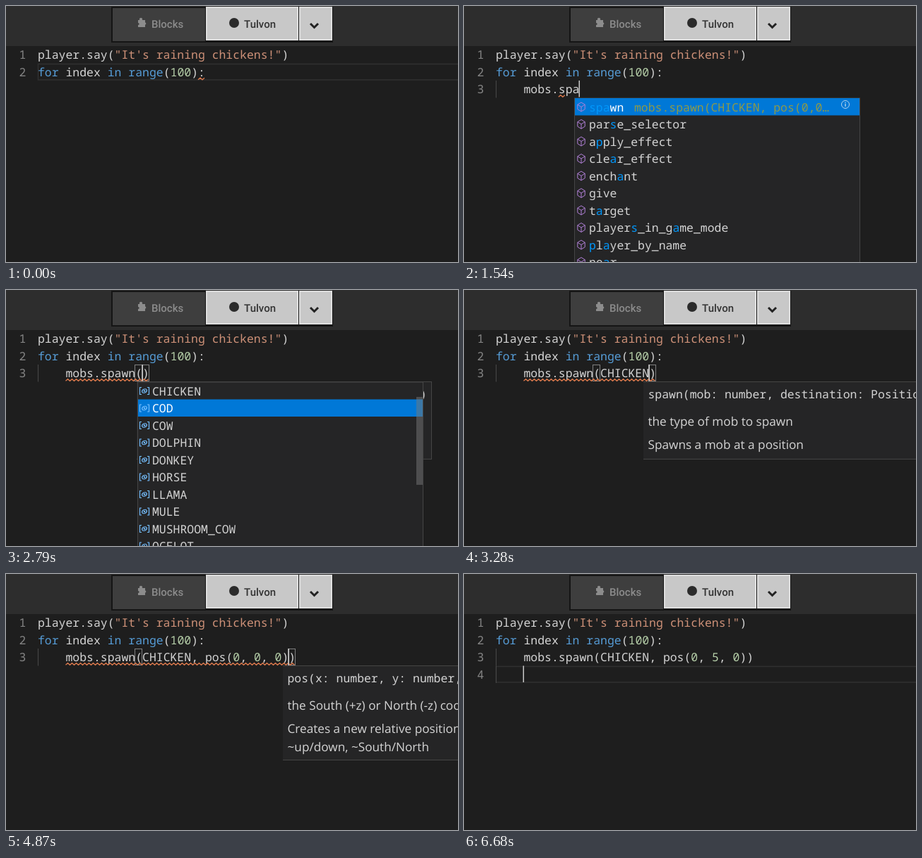
An HTML page with a canvas for the animation above (6750 ms loop, 640 by 364 pixels).

```html
<!DOCTYPE html>
<html lang="en">
<head>
<meta charset="utf-8">
<title>Code editor</title>
<style>
html, body { margin: 0; width: 100%; height: 100%; overflow: hidden; background: #1e1e1e; }
canvas { display: block; }
</style>
</head>
<body>
<canvas id="stage" width="640" height="364"></canvas>
<script>
const ctx = document.getElementById('stage').getContext('2d');
const LOOP = 6750, CHAR = 9.87, ROW = 24.5, LEFT = 45, TOP = 57, POP_Y = 130.5;
const MONO = '500 16.45px "Noto Sans Mono", monospace';
const UI = '500 15px Roboto, sans-serif';
const DOC = '17.2px "Open Sans", sans-serif';
const FG = '#d4d4d4', INDENT = LEFT + 4 * CHAR;

const LISTS = {
  mobs: 'spawn on_mob_killed kill monster apply_effect clear_effect give teleport_to_position teleport_to_player enchant'
    .split(' ').map(s => 'mobs.' + s),
  members: 'spawn parse_selector apply_effect clear_effect enchant give target players_in_game_mode player_by_name near'.split(' '),
  animals: 'CHICKEN COD COW DOLPHIN DONKEY HORSE LLAMA MULE MUSHROOM_COW OCELOT'.split(' '),
  places: 'pos world randpos agent.get_position player.position positions.add builder.position positions.ground_position Position.to_world Position'.split(' ')
};
const DETAIL = {
  mobs: ['mobs.spawn(CHICKEN, po…', 136],
  members: ['mobs.spawn(CHICKEN, pos(0,0…', 85],
  places: ['pos(0, 0, 0)', 252]
};
const SLIDER = { mobs: [131, 48], animals: [152, 125] };
const HINTS = {
  spawn: { h: 111, lines: ['spawn(mob: number, destination: Position)', 'the type of mob to spawn', 'Spawns a mob at a position'] },
  pos: { h: 135, lines: ['pos(x: number, y: number, z: number)', 'the South (+z) or North (-z) coordinate',
    'Creates a new relative position: ~East/West,', '~up/down, ~South/North'] }
};

// [start, third line, caret, list, selected row, hint]
const CALL = 'mobs.spawn(', FULL = CALL + 'CHICKEN, pos(0, 0, 0))', DONE = FULL.replace(', 0,', ', 5,');
const STEPS = [
  [0, null],
  [140, '', 0],
  [350, 'm', 1],
  [420, 'mo', 2, 'mobs', 0],
  [490, 'mob', 3, 'mobs', 0],
  [840, 'mobs', 4, 'mobs', 0],
  [980, 'mobs.', 5, 'members', 0],
  [1260, 'mobs.s', 6, 'members', 0],
  [1400, 'mobs.sp', 7, 'members', 0],
  [1540, 'mobs.spa', 8, 'members', 0],
  [1610, 'mobs.spaw', 9, 'members', 0],
  [1680, 'mobs.spawn', 10, 'members', 0],
  [1820, 'mobs.spawn', 10],
  [1960, CALL + ')', 11, '', 0, 'spawn'],
  [2100, CALL + ')', 11, 'animals', 0, 'spawn'],
  [2450, CALL + ')', 11, 'animals', 1, 'spawn'],
  [2930, CALL + ')', 11, 'animals', 0, 'spawn'],
  [3140, CALL + 'CHICKEN)', 18, '', 0, 'spawn'],
  [3630, CALL + 'CHICKEN,)', 19, '', 0, 'spawn'],
  [3850, CALL + 'CHICKEN, )', 20, 'places', 0, 'spawn'],
  [4590, FULL, 32, '', 0, 'pos'],
  [5010, FULL, 31, '', 0, 'pos'],
  [5080, FULL, 30, '', 0, 'pos'],
  [5150, FULL, 29, '', 0, 'pos'],
  [5220, FULL, 28, '', 0, 'pos'],
  [5290, FULL.replace(', 0,', ', ,'), 27, '', 0, 'pos'],
  [5380, DONE, 28, '', 0, 'pos'],
  [5480, DONE, 33],
  [5620, DONE, -1]
];

function rect(x, y, w, h, color) {
  ctx.fillStyle = color;
  ctx.fillRect(x, y, w, h);
}

function dot(x, y, r, color) {
  ctx.fillStyle = color;
  ctx.beginPath();
  ctx.arc(x, y, r, 0, 7);
  ctx.fill();
}

function line(points, color, width = 1) {
  ctx.strokeStyle = color;
  ctx.lineWidth = width;
  ctx.beginPath();
  points.forEach(([x, y]) => ctx.lineTo(x, y));
  ctx.stroke();
}

function write(text, x, y, color = FG, font = MONO) {
  ctx.font = font;
  ctx.fillStyle = color;
  ctx.fillText(text, x, y);
}

function code(text, x, row) {
  for (const m of text.matchAll(/"[^"]*"|\b(?:for|in|range)\b|\b\d+\b|\w+|[^\w"]+/g)) {
    const s = m[0];
    const color = s[0] === '"' ? '#ce9178' : /^(for|in|range)$/.test(s) ? '#569cd6' : /^\d/.test(s) ? '#b5cea8' : FG;
    write(s, x + m.index * CHAR, TOP + 18 + row * ROW, color);
  }
}

function squiggle(x, row, chars) {
  const pts = [], y = TOP + 22 + row * ROW;
  for (let i = 0; i * 3 <= chars * CHAR; i++) pts.push([x + i * 3, y + (i % 2 ? -1.3 : 1.3)]);
  line(pts, '#d9784c', 1.3);
}

function header() {
  rect(0, 0, 640, 57, '#2d2d2d');
  rect(149, 1, 314, 51, '#151515');
  rect(151, 3, 131, 47, '#3e3e3e');
  for (const [x, w] of [[283, 131], [415, 47]]) {
    rect(x, 1, w, 48, '#dedede');
    rect(x + 2, 3, w - 4, 44, '#c8c8c8');
  }
  const gray = '#8c8c8c';
  rect(187, 20, 10, 10, gray);
  dot(191, 19, 2.2, gray);
  dot(196.5, 25, 1.8, gray);
  dot(187, 25.5, 1.6, '#3e3e3e');
  write('Blocks', 206, 31, gray, UI);
  dot(323, 24, 7, '#2b2b2b');
  write('Tulvon', 337, 31, '#333', UI);
  line([[431, 25], [436.5, 30.5], [442, 25]], '#222', 3);
}

function cube(x, y) {
  const corner = a => [x + 6 * Math.sin(a * Math.PI / 3), y - 6.5 * Math.cos(a * Math.PI / 3)];
  line([0, 1, 2, 3, 4, 5, 6].map(corner), '#b180d7');
  line([corner(5), [x, y], corner(1)], '#b180d7');
  line([[x, y], corner(3)], '#b180d7');
}

function bracketIcon(x, y) {
  for (const s of [-1, 1]) line([[x + s * 4, y - 5], [x + s * 6.5, y - 5], [x + s * 6.5, y + 5], [x + s * 4, y + 5]], '#75beff', 1.2);
  ctx.beginPath();
  ctx.ellipse(x, y, 3.5, 2.5, -0.5, 0, 7);
  ctx.stroke();
  dot(x, y, 1.2, '#75beff');
}

function wrench(x, y) {
  line([[x - 5, y + 5], [x + 2, y - 2]], '#ee9d28', 3);
  dot(x + 3, y - 2, 3.5, '#ee9d28');
}

// Positions of the typed letters found in order, skipping those that are missing
function matches(label, word) {
  const hits = [];
  let from = 0;
  for (const c of word) {
    const i = label.indexOf(c, from);
    if (i >= 0) { hits.push(i); from = i + 1; }
  }
  return hits;
}

function list(name, selected, word, x) {
  rect(x, POP_Y, 405, 240, '#454545');
  rect(x + 1, POP_Y + 1, 403, 240, '#252526');
  rect(x + 1, POP_Y + 0.5 + selected * ROW, 403, ROW, '#0078d7');
  LISTS[name].forEach((label, i) => {
    const y = POP_Y + 13 + i * ROW, tx = x + 21;
    if (name === 'animals') bracketIcon(x + 10, y);
    else if (label === 'Position') wrench(x + 10, y);
    else cube(x + 10, y);
    write(label, tx, y + 6, i === selected ? '#fff' : FG);
    for (const k of matches(label, word)) {
      rect(tx + k * CHAR, y - 9, CHAR, 20, i === selected ? '#0078d7' : '#252526');
      write(label[k], tx + k * CHAR, y + 6, '#0097fb');
    }
  });
  if (DETAIL[name]) {
    const [text, dx] = DETAIL[name];
    write(text, x + dx, POP_Y + 19, '#8c9a4a');
    const ix = x + 384, iy = POP_Y + 9.5;
    ctx.strokeStyle = '#b5d3ee';
    ctx.lineWidth = 1;
    ctx.beginPath();
    ctx.arc(ix, iy, 5.5, 0, 7);
    ctx.stroke();
    rect(ix - 0.7, iy - 1, 1.4, 4, '#b5d3ee');
    rect(ix - 0.7, iy - 3.2, 1.4, 1.4, '#b5d3ee');
  }
  if (SLIDER[name]) rect(x + 395, SLIDER[name][0], 9, SLIDER[name][1], 'rgba(121,121,121,.5)');
}

function hint(name, x) {
  const { h, lines } = HINTS[name];
  rect(x - 1, POP_Y - 0.5, 418, h, '#454545');
  rect(x - 1, POP_Y + 0.5, 417, h - 2, '#252526');
  lines.forEach((s, i) => write(s, x + 5.5, [154, 193, 226, 252][i], FG, i ? DOC : MONO));
}

function brackets(text, caret) {
  const close = text[caret] === ')' ? caret : text[caret - 1] === ')' ? caret - 1 : -1;
  if (close < 0) return;
  let open = close, depth = 0;
  do {
    depth += text[open] === ')' ? 1 : text[open] === '(' ? -1 : 0;
  } while (depth && open--);
  for (const col of [open, close]) {
    ctx.strokeStyle = '#808080';
    ctx.lineWidth = 1;
    ctx.strokeRect(Math.round(INDENT + col * CHAR) - 0.5, 106.5, 10, 23);
  }
}

function activeLine(row) {
  ctx.strokeStyle = '#303030';
  ctx.lineWidth = 1.5;
  ctx.strokeRect(LEFT + 0.5, TOP + row * ROW + 1, 620, ROW - 2);
}

function draw(t) {
  const [start, text, caret, popup, selected, help] = STEPS.findLast(s => s[0] <= t);
  const rows = text === null ? 2 : caret < 0 ? 4 : 3;
  rect(0, 0, 640, 364, '#1e1e1e');
  header();

  if (rows !== 3) activeLine(rows - 1);
  for (let i = 0; i < rows; i++) {
    write(i + 1, 18.5, TOP + 18 + i * ROW, '#858585');
    if (i > 1) rect(LEFT, TOP + i * ROW, 1, ROW, '#484848');
  }
  code('player.say("It\'s raining chickens!")', LEFT, 0);
  code('for index in range(100):', LEFT, 1);
  if (t < 910) squiggle(LEFT + 23 * CHAR, 1, 1);

  if (text !== null) {
    if (caret >= 0) brackets(text, caret);
    code(text, INDENT, 2);
    if (t >= 1120 && t < 2310) squiggle(INDENT + 5 * CHAR, 2, 1);
    if (t >= 2310 && t < 6200) squiggle(INDENT, 2, text.length);
    const x = INDENT + Math.max(caret, 0) * CHAR;
    if (Math.floor((t - start) / 530) % 2 === 0) rect(Math.round(x) - 0.5, TOP + (rows - 1) * ROW, 1.5, ROW - 1, '#c8c8c8');
    const px = Math.round(x - 7);
    if (help) hint(help, px);
    if (popup) list(popup, selected, popup === 'mobs' ? text : popup === 'members' ? text.slice(5) : '', px);
  }
}

ctx.textRendering = 'geometricPrecision';
function frame() {
  draw(performance.now() % LOOP);
  requestAnimationFrame(frame);
}
frame();
</script>
</body>
</html>
```
